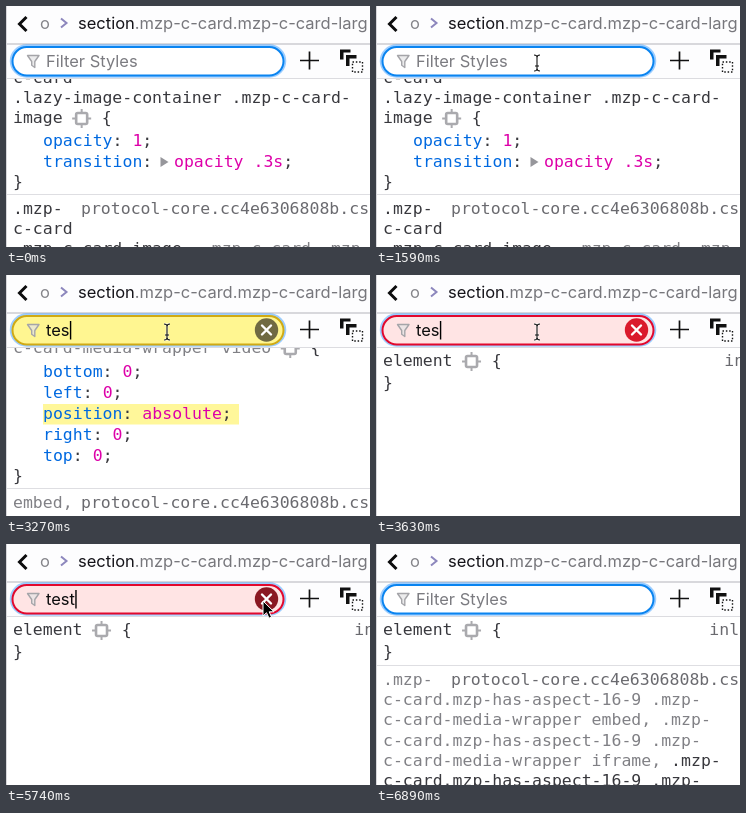
An HTML page for the animation above (7160 ms loop, 364 px wide and 241 px high).

```html
<!DOCTYPE html>
<html lang="en">
<head>
<meta charset="utf-8">
<title>Filter styles</title>
<style>
  html, body { margin: 0; width: 100%; height: 100%; overflow: hidden; background: #fff; }
  svg { display: block; width: 100%; height: 100%; }
  text { white-space: pre; font-size: 16.5px; }
  .mono { font-family: "DejaVu Sans Mono", monospace; }
  .ui { font-family: Inter, sans-serif; }
</style>
</head>
<body>
<svg id="stage" viewBox="0 0 364 241">
  <rect width="364" height="241" fill="#fff"/>
  <g id="rules"></g>

  <rect width="364" height="72" fill="#fdfdfe"/>
  <path d="M0 38H364" stroke="#d8d8dc" stroke-width="2"/>
  <path d="M0 72.5H364" stroke="#dcdce0"/>
  <path d="M.5 0V241" stroke="#d7d7db"/>

  <path d="M20.500 11L13.500 18L20.500 25" fill="none" stroke="#0c0c0d" stroke-width="3"/>
  <text class="ui" x="34" y="23" fill="#85858a">o</text>
  <path d="M55 12.500L60.500 17L55 21.500" fill="none" stroke="#8d87bd" stroke-width="2"/>
  <text class="ui" x="72" y="23" fill="#77777c"><tspan fill="#15141a">section</tspan>.mzp-c-card.mzp-c-card-larg</text>

  <rect x="5.500" y="40" width="273" height="30" rx="15" fill="none" stroke="#0a84ff" stroke-opacity=".4" stroke-width="3.500"/>
  <rect id="field" x="6.500" y="41" width="271" height="28.500" rx="14.250" stroke-width="2"/>
  <path d="M21.500 49.500H33L28.800 55.500V61.500L25.700 59.300V55.500Z" fill="#e4e4e6" fill-opacity=".7" stroke="#a5a5a9" stroke-width="1.400" stroke-linejoin="round"/>
  <text id="hint" class="ui" x="40" y="61" fill="#7b7b80">Filter Styles</text>
  <text id="query" class="ui" x="40" y="61" fill="#0c0c0d"></text>
  <rect id="caret" y="46" width="1.400" height="18.500" fill="#000"/>
  <g id="clear">
    <circle id="disc" cx="260.500" cy="55" r="11.700"/>
    <path d="M256 50.500l9 9m0-9l-9 9" stroke="#fff" stroke-width="2.400" stroke-linecap="round"/>
  </g>

  <path d="M303.500 45.500V63.500M294 54.500H313" stroke="#111" stroke-width="1.700"/>
  <path d="M334 43.500H344.500V46.500H337.500V53.500H334Z M340 49H350.500V52.500H343.500V60H340Z" fill="#111"/>
  <rect x="346.500" y="56" width="10" height="10" fill="none" stroke="#111" stroke-width="1.400" stroke-dasharray="1.500 1.840"/>

  <g id="beam" fill="none">
    <path d="M-3 -8Q0 -8 0 -5.500Q0 -8 3 -8M-3 8Q0 8 0 5.500Q0 8 3 8M0 -6V6M-2 3H2" stroke="#fff" stroke-opacity=".7" stroke-width="2.400"/>
    <path d="M-3 -8Q0 -8 0 -5.500Q0 -8 3 -8M-3 8Q0 8 0 5.500Q0 8 3 8M0 -6V6M-2 3H2" stroke="#111" stroke-width="1.100"/>
  </g>
  <path id="arrow" d="M0 0V15L3.500 11.700L6 17.200L8.500 16L6.200 10.800H11Z" fill="#000" stroke="#fff" stroke-width="1"/>
</svg>
<script>
const LOOP = 7160, TICK = 88.4, CHAR = 9.933;
const $ = id => document.getElementById(id);
const DARK = '#38383d', GRAY = '#808085', LINK = '#6a6a6f', BLUE = '#0069e0', PINK = '#dd00a9';

// Markup helpers for the rule list
const text = (x, y, s, fill = DARK) => `<text class="mono" x="${x}" y="${y}" fill="${fill}">${s}</text>`;
const mark = (x, y, w, h = 20.5) => `<rect x="${x}" y="${y}" width="${w}" height="${h}" fill="#fff79a"/>`;
const line = y => `<path d="M1 ${y}H364" stroke="#dedee2"/>`;
const link = y => text(75, y, 'protocol-core.cc4e6306808b.css', LINK);
const decl = (y, name, value) =>
  text(37, y, `<tspan fill="${BLUE}">${name}</tspan>: <tspan fill="${PINK}">${value}</tspan>;`);

function opener(y, s, fill) {
  const end = 7 + s.length * CHAR, cx = end + 19, cy = y - 4.5;
  return text(7, y, s, fill) + text(end + 39.2, y, '{') +
    `<g fill="none" stroke="#aaaaae"><rect x="${cx - 5.5}" y="${cy - 5.5}" width="11" height="11" rx="1.5" stroke-width="2.6"/>` +
    `<path d="M${cx} ${cy - 9.5}v4m0 11v4M${cx - 9.5} ${cy}h4m11 0h4" stroke-width="2"/></g>`;
}

const lazyRule =
  text(7, 77, 'c-card') + text(7, 97, '.lazy-image-container .mzp-c-card-') + opener(117, 'image') +
  decl(140, 'opacity', '1') +
  text(37, 161, `<tspan fill="${BLUE}">transition</tspan>:`) +
  '<path d="M154.500 151L162.500 156L154.500 161Z" fill="#96969b"/>' +
  text(168, 161, `<tspan fill="${PINK}">opacity .3s</tspan>;`) +
  text(7, 181, '}') + line(188.5) +
  text(7, 208, '.mzp-') + link(208) + text(7, 228, 'c-card') +
  text(7, 248, `.mzp-c-card-image<tspan fill="${GRAY}">, .mzp-c-card .mzp-</tspan>`);

const lazyMarks = mark(7, 73, 60, 9) + mark(7, 82, 340) + mark(7, 102.5, 50) +
  mark(37, 125, 115, 21) + mark(37, 146, 256) + mark(75, 193, 289, 21);

const videoRule = mark(37, 129, 196) + opener(78, 'c-card-media-wrapper video', GRAY) +
  decl(102, 'bottom', '0') + decl(123, 'left', '0') + decl(144, 'position', 'absolute') +
  decl(165, 'right', '0') + decl(185.5, 'top', '0') + text(7, 205.5, '}') + line(213.5) +
  text(7, 233, 'embed,', GRAY) + link(233);

const element = x => opener(91, 'element') + text(7, 113, '}') + text(x, 91, 'inline', LINK);

const aspect = 'c-card.mzp-has-aspect-16-9 .mzp-';
const fullList = element(333.3) + line(121.5) + text(7, 141, '.mzp-', GRAY) + link(141) +
  text(7, 161, aspect, GRAY) + text(7, 181, 'c-card-media-wrapper embed, .mzp-', GRAY) +
  text(7, 202, aspect, GRAY) +
  text(7, 222, `c-card-media-wrapper iframe, <tspan fill="${DARK}">.mzp-</tspan>`, GRAY) +
  text(7, 242, aspect);

// Every track is a list of [tick, value]; the last one reached applies
const lists = [[0, lazyRule], [28, lazyMarks + lazyRule], [30, videoRule], [38, element(348.3)], [73, fullList]];
const typed = [[0, ''], [27, 't'], [29, 'te'], [37, 'tes'], [43, 'test'], [71, '']];
const blink = [[0, 0], [12, 1], [18, 0], [25, 1], [43, 0], [44, 1], [50, 0], [57, 1], [69, 0]];
const white = { fill: [255, 255, 255], edge: [10, 132, 240], disc: [112, 112, 116] };
const yellow = { fill: [255, 246, 145], edge: [208, 170, 20], disc: [112, 106, 66] };
const red = { fill: [255, 228, 228], edge: [226, 8, 45], disc: [218, 26, 44] };
const moods = [[-9, white], [28, yellow], [38, red], [71, white]];
const path = [
  [3, 13, 152], [4, 80, 150], [5, 180, 136], [6, 290, 110], [7, 345, 85], [8, 320, 73], [9, 260, 64], [10, 206, 60],
  [12, 206, 60], [13, 195, 51], [14, 180, 49], [15, 168, 54], [16, 161, 57],
  [56, 161, 57], [57, 165, 62], [60, 210, 94], [62, 240, 80], [64, 253, 61], [65, 257, 57],
  [71, 257, 57], [73, 265, 100], [75, 285, 170], [78, 325, 262]
];

const indexAt = (track, k) => track.reduce((found, p, i) => p[0] <= k ? i : found, 0);
const at = (track, k) => track[indexAt(track, k)][1];
const mix = (a, b, p) => a + (b - a) * p;
const blend = (a, b, p) => `rgb(${a.map((v, i) => Math.round(mix(v, b[i], p)))})`;
const show = (node, on) => node.setAttribute('visibility', on ? 'visible' : 'hidden');

let shown;
function drawRules(k) {
  const html = at(lists, k);
  if (html !== shown) $('rules').innerHTML = shown = html;
}

function drawField(k) {
  const word = at(typed, k), i = indexAt(moods, k);
  const now = moods[i][1], old = moods[Math.max(0, i - 1)][1];
  const p = Math.min(1, (k - moods[i][0]) / 3), ease = p * p * (3 - 2 * p);
  $('field').setAttribute('fill', blend(old.fill, now.fill, ease));
  $('field').setAttribute('stroke', blend(old.edge, now.edge, ease));
  const disc = k >= 69 ? 'rgb(92,14,22)' : k >= 63 ? 'rgb(138,24,34)' : blend(old.disc, now.disc, ease);
  $('disc').setAttribute('fill', disc);
  $('query').textContent = word;
  show($('hint'), !word);
  show($('clear'), word);
  show($('caret'), at(blink, k));
  $('caret').setAttribute('x', 40.3 + (word ? $('query').getComputedTextLength() : 0));
}

function drawPointer(k) {
  const on = k >= 3 && k < 78;
  const i = Math.min(indexAt(path, k), path.length - 2);
  const [k0, x0, y0] = path[i], [k1, x1, y1] = path[i + 1];
  const p = Math.max(0, Math.min(1, (k - k0) / (k1 - k0)));
  const x = mix(x0, x1, p), y = mix(y0, y1, p);
  const inField = y > 39 && y < 71 && x > 6 && x < (at(typed, k) ? 249 : k < 71 ? 277 : 0);
  for (const id of ['beam', 'arrow']) $(id).setAttribute('transform', `translate(${x} ${y})`);
  show($('beam'), on && inField);
  show($('arrow'), on && !inField);
}

function render(ms) {
  const k = Math.floor((ms % LOOP + 8) / TICK);
  drawRules(k);
  drawField(k);
  drawPointer(k);
}

const start = performance.now();
function loop() {
  render(performance.now() - start);
  requestAnimationFrame(loop);
}
loop();
</script>
</body>
</html>
```
